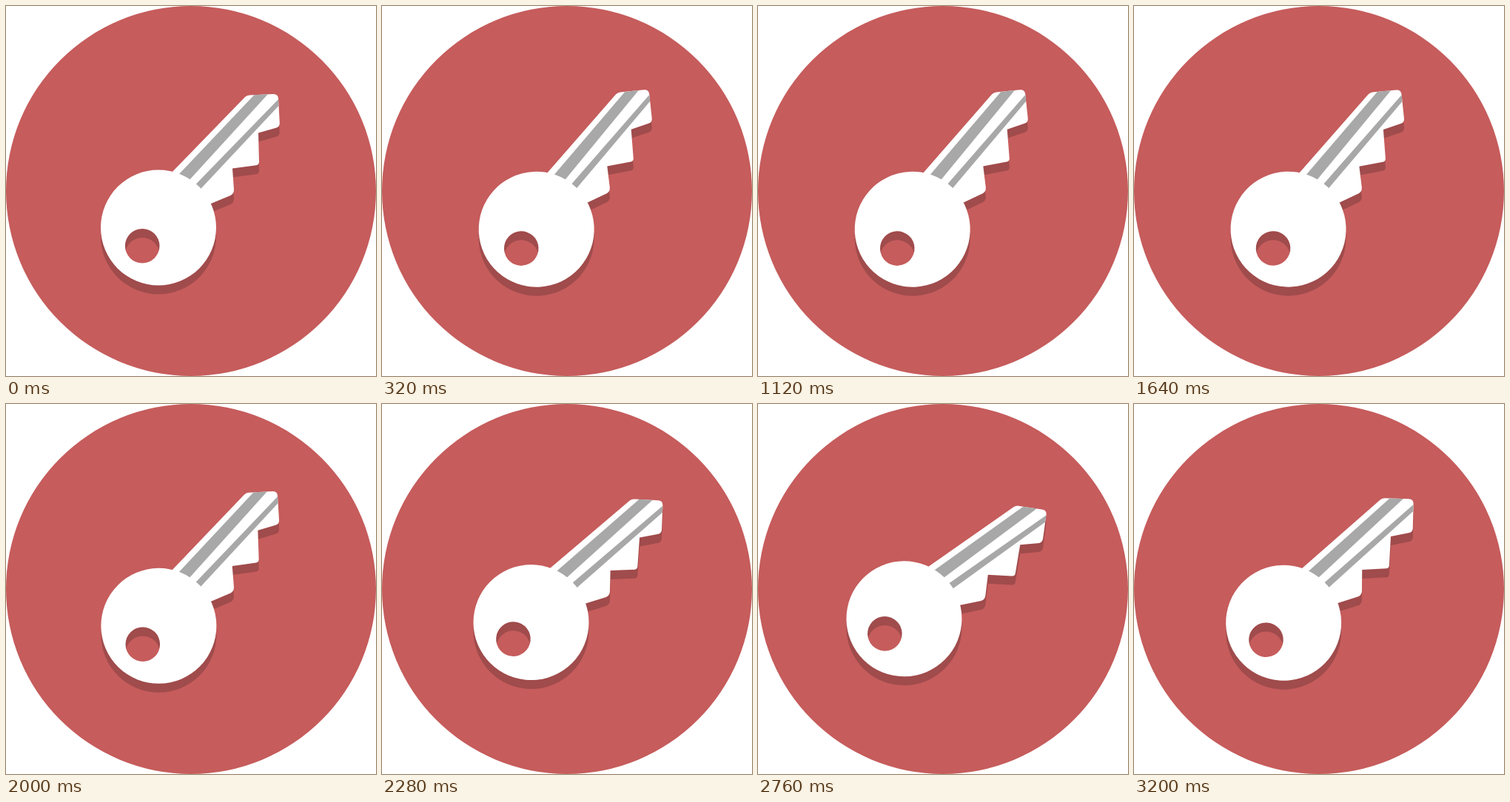
Animation, 500 px wide and 500 px high, one loop 3240 ms. Source, as an HTML page:

```html
<!DOCTYPE html>
<html lang="en">
<head>
<meta charset="utf-8">
<title>Key</title>
<style>
  html, body { margin: 0; width: 100%; height: 100%; overflow: hidden; background: #fff; }
  svg { display: block; width: 100%; height: 100%; }
</style>
</head>
<body>
<svg viewBox="0 0 500 500">
  <defs>
    <path id="blade" d="M221 228 L323 123 Q325.5 120.6 329 120.4 L361 119 Q367.6 118.8 368 125
      L369.8 158 Q370 163 365.5 164.5 L341 171.5 L342 210.5 Q342 214.6 338 215.2
      L306 219.5 L308 248 Q308.2 253.6 303.5 256 L277 267 L240 275 Z"/>
    <path id="head" fill-rule="evenodd" d="M128 299.5 a78 78 0 1 1 156 0 a78 78 0 1 1 -156 0 Z
      M160.9 324.2 a23.3 23.3 0 1 0 46.6 0 a23.3 23.3 0 1 0 -46.6 0 Z"/>
    <clipPath id="edge"><use href="#blade"/></clipPath>
  </defs>
  <circle cx="250" cy="250" r="250" fill="#c65c5c"/>
  <g transform="translate(0 12)">
    <g class="turn" fill="#a04b4c">
      <use href="#blade"/>
      <use href="#head"/>
    </g>
  </g>
  <g class="turn" fill="#fff">
    <use href="#blade"/>
    <g clip-path="url(#edge)" fill="#a8a8a8">
      <path d="M230 231.2 L337 118.5 L354.5 118.5 L245 238.2 Z"/>
      <path d="M253 244.6 L371 122.9 L371 132.3 L259 251.4 Z"/>
    </g>
    <use href="#head"/>
  </g>
</svg>
<script>
  const LOOP = 3240, STEP = 40;
  // time in ms, angle in degrees
  const swing = [
    [0, 0], [320, -3.05], [720, -6], [1120, -3.05], [1380, -1.8], [1640, -2.9],
    [1770, -3.4], [2280, 5.45], [2720, 11], [3200, 4.6]
  ];
  const rise = i => (swing[i + 1][1] - swing[i][1]) / (swing[i + 1][0] - swing[i][0]);

  // Tangents are flat at turning points.
  const slopes = swing.map((p, i) => {
    if (i === 0) return rise(0);
    if (i === swing.length - 1) return rise(i - 1);
    const a = rise(i - 1), b = rise(i);
    if (a * b <= 0) return 0;
    const before = p[0] - swing[i - 1][0], after = swing[i + 1][0] - p[0];
    return (a * after + b * before) / (before + after);
  });

  function angleAt(t) {
    let i = 0;
    while (i < swing.length - 2 && t >= swing[i + 1][0]) i++;
    const [t0, a0] = swing[i], [t1, a1] = swing[i + 1];
    const h = t1 - t0, u = (t - t0) / h, v = 1 - u;
    return a0 * v * v * (1 + 2 * u) + a1 * u * u * (1 + 2 * v)
      + h * u * v * (slopes[i] * v - slopes[i + 1] * u);
  }

  const parts = document.querySelectorAll('.turn');
  const start = performance.now();
  function draw() {
    const t = Math.max(0, performance.now() - start) % LOOP;
    const angle = angleAt(Math.floor(t / STEP) * STEP);
    parts.forEach(p => p.setAttribute('transform', `rotate(${angle.toFixed(3)} 250 250)`));
    requestAnimationFrame(draw);
  }
  draw();
</script>
</body>
</html>
```
